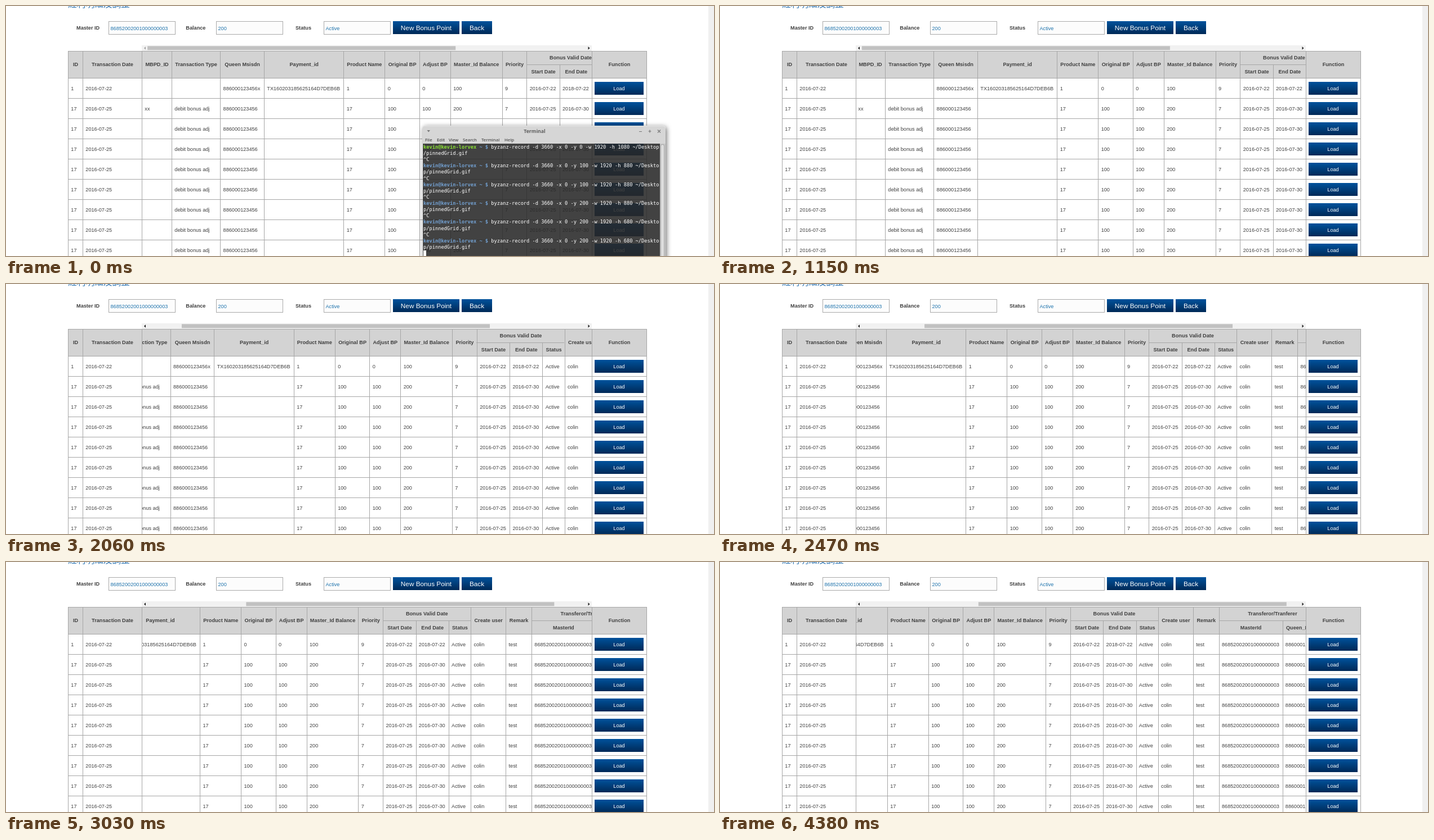
Write an HTML page that moves like this. It is 1257 px wide and 445 px high and loops after 4.45 s.

```html
<!DOCTYPE html>
<html lang="en">
<head>
<meta charset="utf-8">
<title>Pinned grid</title>
<style>
  html, body { margin: 0; width: 100%; height: 100%; overflow: hidden; background: #fff; }
  #stage { position: relative; width: 1257px; height: 445px; overflow: hidden;
    font: 9.166px/10px "Liberation Sans", Arial, sans-serif; color: #404040; }
  #stage div, pre, svg { position: absolute; white-space: pre; margin: 0; }
  .line { background: #a6a6a6; }
  .head { background: #d3d3d3; }
  .bold { font-weight: bold; }
  .mid { text-align: center; }
  .title { font: 15.7px/16px "Noto Sans CJK TC", "Noto Sans CJK", "Noto Sans CJK SC", sans-serif; color: #337ab7; }
  .input { box-sizing: border-box; border: 1px solid #aaa; background: #fcfcfc; }
  .value { color: #1f74ad; }
  .button { background: linear-gradient(#00529c, #002957); color: #fff; text-align: center; line-height: 24px; }
  .big { font-size: 11.78px; }
  .clip { overflow: hidden; }
  .page-bar { background: #f0f0f0; }
  .track { background: #f1f1f1; }
  .thumb { background: #c1c1c1; }
  #terminal { left: 739px; top: 213px; width: 432px; height: 250px; border-radius: 5px 5px 0 0;
    box-shadow: 2px 2px 9px rgba(0, 0, 0, .55); font-family: "Noto Sans", sans-serif; }
  .chrome { background: #d6d6d6; border-radius: 5px 5px 0 0; box-shadow: inset 0 1px #e6e6e6; }
  .caption { font-size: 8.73px; font-weight: bold; color: #5e5e5e; text-align: center; }
  .menu { font-size: 7.86px; color: #333; }
  .screen { background: rgba(40, 40, 40, .88); }
  .side { background: #c6c6c6; }
  .knob { background: #dedede; box-shadow: 0 0 0 1px #a8a8a8; border-radius: 3px; }
  pre { left: 2px; top: 32.9px; font: 8.7px/11.13px "DejaVu Sans Mono", monospace; color: #fff; }
  pre b { color: #8ae234; }
  pre b + b { color: #729fcf; }
  .cursor { background: #fff; }
</style>
</head>
<body>
<div id="stage"></div>
<script>
const LOOP = 4450, MAX_SCROLL = 338, ROWS = 9, ROW = 36, TOP = 80, BODY = 128;
const stage = document.getElementById('stage');

function box(parent, cls, x, y, w, h, text = '') {
  const el = document.createElement('div');
  el.className = cls;
  el.style.cssText = `left:${x}px;top:${y}px;width:${w}px;height:${h}px`;
  el.textContent = text;
  parent.append(el);
  return el;
}
const text = (parent, x, baseline, str, cls = '', w = 200) =>
  box(parent, cls, x, baseline - 8, w, 10, str);

function column(parent, origin, [x, title, values, level = 'full'], next) {
  const left = x - origin, inner = level === 'inner';
  box(parent, 'line', left, inner ? 104 : TOP, 1, 400);
  text(parent, left, level === 'full' ? 107 : 120, title, 'bold mid', next - x + 1);
  for (let i = 0; i < ROWS; i++) {
    const value = values[Math.min(i, values.length - 1)];
    if (value) text(parent, left + 5.3, BODY + 22 + i * ROW, value);
  }
}
function columns(parent, origin, list, end) {
  list.forEach((c, i) => column(parent, origin, c, i + 1 < list.length ? list[i + 1][0] : end));
}

// Page header
box(stage, 'title', 110, -12, 130, 16, '紅利明細及調整');
box(stage, 'page-bar', 1247, 0, 10, 445);
for (const [label, x, value, inputX] of [
  ['Master ID', 125, '86852002001000000003', 182],
  ['Balance', 319.3, '200', 373],
  ['Status', 514, 'Active', 564]]) {
  text(stage, x, 42, label, 'bold');
  box(stage, 'input', inputX, 27, 119, 24);
  text(stage, inputX + 3.5, 43, value, 'value');
}
box(stage, 'button big', 687, 27, 118, 23, 'New Bonus Point');
box(stage, 'button big', 809, 27, 54, 23, 'Back');

// Table
box(stage, 'head', 110, TOP, 1028, 48);
const view = box(stage, 'clip', 241, 0, 799, 445);
const sheet = box(view, '', 0, 0, 1140, 445);
const master = ['86852002001000000003'], phone = '886000123456';

columns(stage, 0, [
  [110, 'ID', ['1', '17']],
  [136, 'Transaction Date', ['2016-07-22', '2016-07-25']]], 241);
columns(sheet, 241, [
  [241, 'MBPD_ID', ['', 'xx', '']],
  [294, 'Transaction Type', ['', 'debit bonus adj']],
  [380.3, 'Queen Msisdn', [phone + 'x', phone]],
  [458, 'Payment_id', ['TX160203185625164D7DEB6B', '']],
  [599.4, 'Product Name', ['1', '17']],
  [672.4, 'Original BP', ['0', '100']],
  [733.9, 'Adjust BP', ['0', '100']],
  [788.9, 'Master_Id Balance', ['100', '200']],
  [880.6, 'Priority', ['9', '7']],
  [924.4, 'Start Date', ['2016-07-22', '2016-07-25'], 'first'],
  [982.7, 'End Date', ['2018-07-22', '2016-07-30'], 'inner'],
  [1041, 'Status', ['Active'], 'inner'],
  [1080.3, 'Create user', ['colin']],
  [1142.4, 'Remark', ['test']],
  [1188.2, 'MasterId', master, 'first'],
  [1301, 'Queen_Msisdn', [phone], 'inner']], 1378);
for (const [title, x, end] of [['Bonus Valid Date', 924, 1080], ['Transferor/Tranferer', 1188, 1378]]) {
  box(sheet, 'line', x - 241, 104, end - x, 1);
  text(sheet, x - 241, 95, title, 'bold mid', end - x + 1);
}
column(stage, 0, [1040, 'Function', ['']], 1137);
for (const x of [241, 1137]) box(stage, 'line', x, TOP, 1, 400);
box(stage, 'line', 110, TOP, 1028, 1);
for (let i = 0; i < ROWS; i++) {
  box(stage, 'line', 110, BODY + i * ROW, 1028, 1);
  box(stage, 'button', 1045, BODY + 7 + i * ROW, 87, 23, 'Load');
}

// Horizontal scrollbar
box(stage, 'track', 241, 70, 799, 10);
const thumb = box(stage, 'thumb', 0, 0, 546.6, 7.2);
stage.insertAdjacentHTML('beforeend', `<svg width="1257" height="90" style="left:0;top:0">
  <path id="prev" d="M248 72.3v5.4l-3-2.7z"/><path id="next" d="M1033.5 72.3v5.4l3-2.7z"/></svg>`);
const prev = document.getElementById('prev'), next = document.getElementById('next');

// Terminal window
const terminal = box(stage, '', 0, 0, 0, 0);
terminal.id = 'terminal';
terminal.style.cssText = '';
box(terminal, 'chrome', 0, 0, 432, 32);
text(terminal, 0, 13, 'Terminal', 'caption', 399);
[['File', 5], ['Edit', 26], ['View', 47], ['Search', 72], ['Terminal', 105], ['Help', 146]]
  .forEach(([name, x]) => text(terminal, x, 28, name, 'menu'));
terminal.insertAdjacentHTML('beforeend', `<svg width="432" height="20" style="left:0;top:0" fill="none" stroke="#777" stroke-width="1.2">
  <path d="M8.5 8h5.5l-2.75 3.5z" fill="#777" stroke="none"/>
  <path d="M385 10.5h5M401.5 10h5M404 7.5v5M418 7.5l5 5M423 7.5l-5 5"/></svg>`);
box(terminal, 'screen', 1, 32, 421, 218);
box(terminal, 'side', 422, 32, 10, 218);
box(terminal, 'knob', 424, 34, 5, 216);

const prompt = 'kevin@kevin-lorvex ~ $ ';
const output = [[0, 1080], [100, 880], [100, 880], [200, 880], [200, 680], [200, 680]].map(([y, h]) => {
  const command = `${prompt}byzanz-record -d 3660 -x 0 -y ${y} -w 1920 -h ${h} ~/Desktop/pinnedGrid.gif`;
  return command.match(/.{1,80}/g).join('\n')
    .replace(/^(\S+) (~ \$)/, '<b>$1</b> <b>$2</b>');
}).join('\n^C\n');
terminal.insertAdjacentHTML('beforeend', `<pre>${output}</pre>`);
box(terminal, 'cursor', 2, 222, 5, 11);

// Drag path: step, offset, speed per step
const drag = [[0, 1, 2], [8, 38.5, 7], [19, 163, 11.4], [27, 255.2, 12.5], [33, MAX_SCROLL, 14]];

function hermite(step) {
  const i = Math.max(1, drag.findIndex(k => step <= k[0]));
  const [s0, p0, v0] = drag[i - 1], [s1, p1, v1] = drag[i];
  const d = s1 - s0, u = (step - s0) / d, w = 1 - u;
  return w * w * ((1 + 2 * u) * p0 + u * d * v0) + u * u * ((3 - 2 * u) * p1 - w * d * v1);
}
function scrollAt(t) {
  if (t < 1150) return 0;
  if (t >= 4230) return [332, 319, 302.5][Math.min(2, Math.floor((t - 4230) / 70))];
  const start = t < 2470 ? 1150 : 1140;
  return hermite(Math.min(33, Math.floor((t - start) / 70)));
}

const began = performance.now();
function draw() {
  const t = (performance.now() - began) % LOOP;
  const offset = scrollAt(t);
  terminal.style.display = t < 400 ? '' : 'none';
  sheet.style.left = -offset + 'px';
  thumb.style.transform = `translate(${251.2 + offset * 232 / MAX_SCROLL}px, 71.4px)`;
  prev.setAttribute('fill', offset > 0 ? '#222' : '#a3a3a3');
  next.setAttribute('fill', offset < MAX_SCROLL ? '#222' : '#a3a3a3');
  requestAnimationFrame(draw);
}
draw();
</script>
</body>
</html>
```
